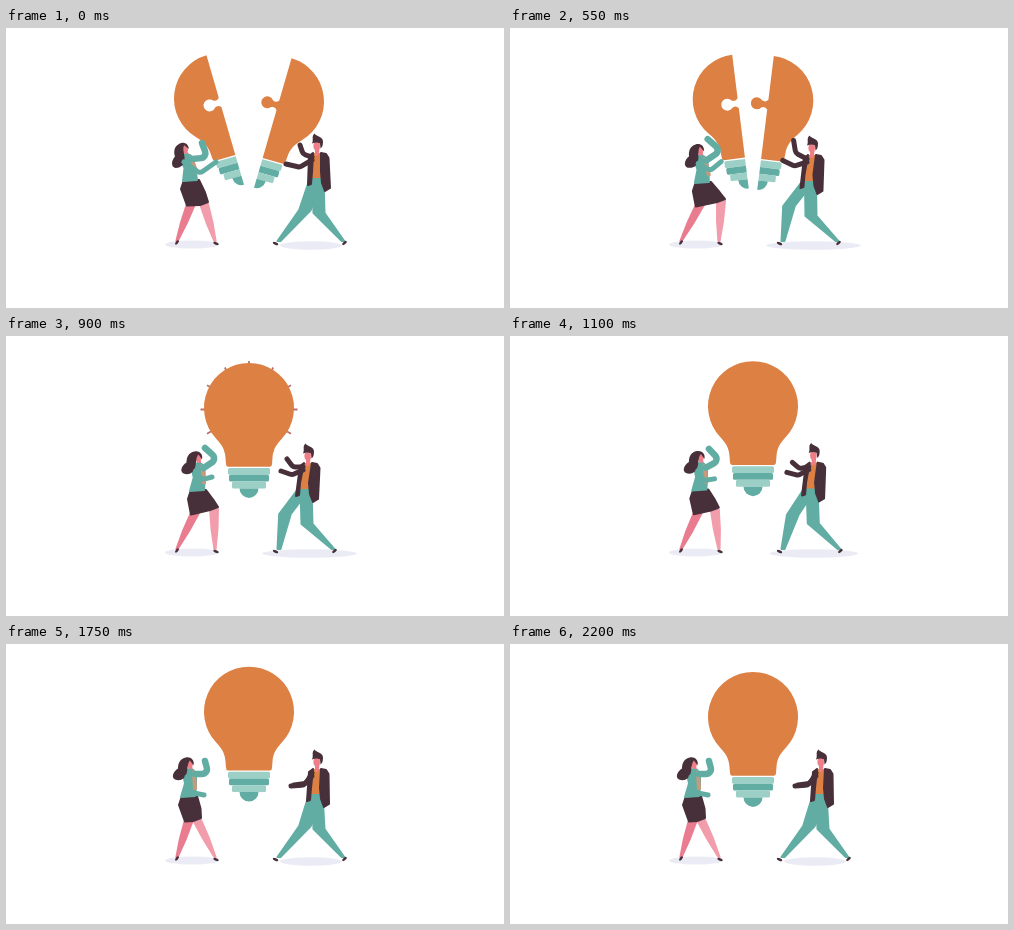
These frames come from a looping animation (498x280 px, 2.55 s). An HTML page with a canvas:

```html
<!DOCTYPE html>
<html lang="en">
<head>
<meta charset="utf-8">
<title>Two halves of an idea</title>
<style>
  html, body { margin: 0; width: 100%; height: 100%; overflow: hidden; background: #fff; }
  canvas { display: block; width: 498px; height: 280px; }
</style>
</head>
<body>
<canvas id="stage"></canvas>
<script>
const LOOP = 2550, STEP = 50, LAST = 2200, JOINED = 720;
const ORANGE = '#dc8044', DARK = '#47303a', TEAL = '#62ada3', MINT = '#9ccfc6';
const ROSE = '#ea7c90', PINK = '#f29dab', SKIN = '#ee7f88', TAN = '#c79a7c';
const SHADE = '#ebebf6', RAY = '#b9726c';

const canvas = document.getElementById('stage');
const ctx = canvas.getContext('2d');
const dpr = window.devicePixelRatio || 1;
canvas.width = 498 * dpr;
canvas.height = 280 * dpr;

const lerp = (a, b, p) => a + (b - a) * p;
const mid = (a, b) => [(a[0] + b[0]) / 2, (a[1] + b[1]) / 2];
const add = (p, dx, dy) => [p[0] + dx, p[1] + dy];

// Smooth 0 to 1 between two times.
function ramp(t, from, to) {
  const p = Math.min(1, Math.max(0, (t - from) / (to - from)));
  return (1 - Math.cos(Math.PI * p)) / 2;
}

// Everything that moves follows from these few values.
const stateAt = t => ({
  lean: ramp(t, 350, 550) - ramp(t, 1000, 1350),
  pull: ramp(t, 0, 300) - ramp(t, 350, 550),
  hold: 1 - ramp(t, 350, JOINED),
  apart: 30 + 5 * ramp(t, 0, 300),
  bulbY: 72 - 8.5 * ramp(t, 950, 1450) + 9.5 * ramp(t, 1450, 2100),
  glow: Math.sin(Math.PI * Math.min(1, Math.max(0, (t - 750) / 300)))
});

// Each joint: standing, leaning in, shift while holding a half.
const woman = {
  back: -4.5,
  neck: [[184, 126], [192.5, 128], [-3, 1]],
  high: [[199, 117], [199, 112], [-3, -2]],
  low: [[198, 151], [206, 141], [12, -17]],
  hip: [[184, 153], [193, 155], [2, 0]],
  kneeL: [[183, 176], [189, 177], [2, 0]],
  kneeR: [[191, 176], [208, 173], [7, 0]]
};
const man = {
  back: 4.5,
  neck: [[311, 125], [302, 127], [0, 0]],
  high: [[288, 141], [281, 123], [6, -24]],
  low: [[285, 142], [275, 135], [-5, -6]],
  hip: [[309, 153], [298, 156], [1, 0]],
  kneeL: [[299, 182], [279, 178], [0, 0]],
  kneeR: [[313, 185], [301, 188], [0, 0]],
  foot: [[337, 213], [327, 213], [0, 0]]
};

function pose(figure, { lean, hold, pull }) {
  const out = {};
  for (const [name, joint] of Object.entries(figure)) {
    if (name === 'back') continue;
    const [stand, lunge, grip] = joint;
    const upper = ['neck', 'high', 'low'].includes(name);
    out[name] = stand.map((v, i) => lerp(v, lunge[i], lean) + grip[i] * hold);
    if (upper) out[name][0] += figure.back * pull;
  }
  return out;
}

const cut = 'M0 -45V-1Q-2.5 2.5 -6.2 .4A6 6 0 1 0 -6.2 7.6Q-2.5 5.5 0 9V58.7';
const side = s => `H${21 * s}Q${23 * s} 58.7 ${23 * s} 56L${23.5 * s} 50` +
  `C${24 * s} 43 ${26 * s} 38 ${33 * s} 30.6A45 45 0 0 ${s > 0 ? 0 : 1} 0 -45Z`;
const glass = { left: new Path2D(cut + side(-1)), right: new Path2D(cut + side(1)) };
glass.whole = new Path2D('M0 -45V58.7' + side(-1) + 'M0 -45V58.7' + side(1));

const womanHair = new Path2D('M4.500 2C6 -4 1 -7 -3 -6C-9 -5 -11 0 -11 5C-16 8 -18 14 -14 16C-8 18 -4 15 -2.500 10C-1 6 -2 0 1 -3Z');
const manHair = new Path2D('M-5 -2C-3 -6 -6 -9 -2.500 -12C-1 -9 6 -9 6 -4C6 0 5 2 3.500 3L3 -2Q0 -4 -5 -2Z');

function fill(color, path) {
  ctx.fillStyle = color;
  path ? ctx.fill(path) : ctx.fill();
}

function line(color, width, cap = 'round') {
  ctx.strokeStyle = color;
  ctx.lineWidth = width;
  ctx.lineCap = cap;
  ctx.lineJoin = 'round';
  ctx.stroke();
}

function oval(color, x, y, rx, ry, turn = 0) {
  ctx.beginPath();
  ctx.ellipse(x, y, rx, ry, turn, 0, 7);
  fill(color);
}

function at(x, y, turn, draw) {
  ctx.save();
  ctx.translate(x, y);
  ctx.rotate(turn);
  draw();
  ctx.restore();
}

// Polygon with softened corners.
function shape(color, ...pts) {
  ctx.beginPath();
  pts.forEach(p => ctx.lineTo(...p));
  ctx.closePath();
  fill(color);
  line(color, 2);
}

// The elbow sits off the line from shoulder to hand by a share of its length.
function arm(color, shoulder, hand, bend, width) {
  const dx = hand[0] - shoulder[0], dy = hand[1] - shoulder[1];
  const elbow = add(mid(shoulder, hand), -dy * bend, dx * bend);
  ctx.beginPath();
  ctx.moveTo(...shoulder);
  ctx.arcTo(...elbow, ...hand, 5);
  ctx.lineTo(...hand);
  line(color, width);
}

// Hip, knee and ankle with their half widths.
function leg(color, ...joints) {
  shape(color, ...joints.map(([p, w]) => add(p, -w, 0)),
    ...joints.reverse().map(([p, w]) => add(p, w, 0)));
}

function drawBulb(part, x, y, turn) {
  const from = part === 'right' ? 0 : -1, to = part === 'left' ? 0 : 1;
  at(x, y, turn, () => {
    fill(ORANGE, glass[part]);
    [21, 20, 17].forEach((w, i) => {
      const l = from ? 1.5 : 0, r = to ? 1.5 : 0;
      ctx.beginPath();
      ctx.roundRect(from * w, 60 + 6.8 * i, (to - from) * w, 6.8, [l, r, r, l]);
      fill(i === 1 ? TEAL : MINT);
    });
    ctx.beginPath();
    ctx.moveTo(0, 80.4);
    ctx.ellipse(0, 80.4, 9.5, 9.5, 0, to ? 0 : Math.PI / 2, from ? Math.PI : Math.PI / 2);
    fill(TEAL);
  });
}

function drawRays(y, glow) {
  if (glow < .01) return;
  const r = 44 + 4.5 * glow;
  ctx.beginPath();
  for (let i = 0; i < 12; i++) {
    const c = Math.cos(i * Math.PI / 6), s = Math.sin(i * Math.PI / 6);
    ctx.moveTo(243 + 40 * c, y + 40 * s);
    ctx.lineTo(243 + r * c, y + r * s);
  }
  line(RAY, 1.8, 'butt');
}

function drawWoman(s) {
  const { neck, high, low, hip, kneeL, kneeR } = pose(woman, s);
  const head = add(neck, -1 - 2 * s.hold, -6.5), tilt = -.3 * s.hold;
  const feet = [[171, 213], [209, 213]];
  leg(ROSE, [kneeL, 4], [mid(kneeL, feet[0]), 3], [feet[0], .6]);
  leg(PINK, [kneeR, 4], [mid(kneeR, feet[1]), 3], [feet[1], .6]);
  oval(DARK, 171, 214.5, 2.6, 1.3, -.9);
  oval(DARK, 210, 215.5, 2.8, 1.3, .35);

  shape(SKIN, add(head, 0, 3), add(head, 2, 3), add(neck, 3, 2), add(neck, 0, 2));
  shape(DARK, add(hip, -8, -1), add(hip, 7, -1), add(mid(hip, kneeR), 7, 0), add(kneeR, 4, -2),
    add(kneeR, -4, 1), add(kneeL, -4, 1.5), add(hip, -11, 8));
  shape(TEAL, add(neck, -4, -.5), add(neck, 3, 0), add(neck, 6, 3), add(mid(neck, hip), 6, 2),
    add(hip, 5, -1), add(hip, -9, 0), add(mid(neck, hip), -5, 0), add(neck, -7, 3));
  shape(TAN, add(neck, 3, 1.5), add(neck, 5, 3), add(hip, 6, -8), add(hip, 4, -8));
  at(...head, tilt, () => {
    oval(SKIN, 1, .5, 2.8, 4);
    fill(DARK, womanHair);
  });
  arm(TEAL, add(neck, 5, 4), high, .65, 6.5);
  arm(TEAL, add(neck, -3, 7), low, .35, 5);
}

function drawMan(s) {
  const { neck, high, low, hip, kneeL, kneeR, foot } = pose(man, s);
  const head = add(neck, 0, -7.5);
  leg(TEAL, [add(hip, 2, -3), 5.5], [kneeR, 5.5], [foot, 1.2]);
  leg(TEAL, [add(hip, 0, -3), 6], [kneeL, 5.8], [[273, 213], 1.5]);
  oval(DARK, 269.5, 215.5, 3, 1.3, .45);
  oval(DARK, foot[0] + 1.5, foot[1] + 2, 2.8, 1.3, -.7);

  shape(ORANGE, add(neck, -4, 1), add(neck, 3, 1), add(hip, 4, -4), add(hip, -4, -4));
  shape(DARK, add(neck, 4, 0), add(neck, 9, 1), add(neck, 11.5, 5), add(hip, 14, 7), add(hip, 9, 10),
    add(hip, 6, 2), add(hip, 5, -9));
  shape(DARK, add(neck, -4, 0), add(neck, -8, 3), add(hip, -8, 4), add(hip, -5, 3), add(hip, -4, -9));
  shape(SKIN, add(head, -1, 3), add(head, 1.5, 3), add(neck, 1, 1), add(neck, -1, 2));
  at(...head, 0, () => {
    oval(SKIN, -.3, .5, 3.3, 4.4);
    fill(DARK, manHair);
  });
  arm(DARK, add(neck, -5, 4), high, -.25, 5);
  arm(DARK, add(neck, -5, 7), low, -.2, 5);
}

function draw(t) {
  const s = stateAt(t);
  ctx.setTransform(dpr, 0, 0, dpr, 0, 0);
  ctx.fillStyle = '#fff';
  ctx.fillRect(0, 0, 498, 280);
  oval(SHADE, 186, 216.5, 27, 4);
  oval(SHADE, lerp(305, 303.5, s.lean), 217.5, lerp(31, 47.5, s.lean), 4.2);
  if (t < JOINED) {
    const gap = s.apart * s.hold, turn = .282 * s.hold;
    drawBulb('left', 243 - gap, 72 - 1.5 * s.hold, -turn);
    drawBulb('right', 243 + gap, 72 + (1.5 + 2.5 * s.pull) * s.hold, turn);
  } else {
    drawRays(s.bulbY + 1.5, s.glow);
    drawBulb('whole', 243, s.bulbY, 0);
  }
  drawWoman(s);
  drawMan(s);
}

const start = performance.now();
function tick() {
  const t = (performance.now() - start) % LOOP;
  draw(Math.min(LAST, Math.floor(t / STEP) * STEP));
  requestAnimationFrame(tick);
}
tick();
</script>
</body>
</html>
```
